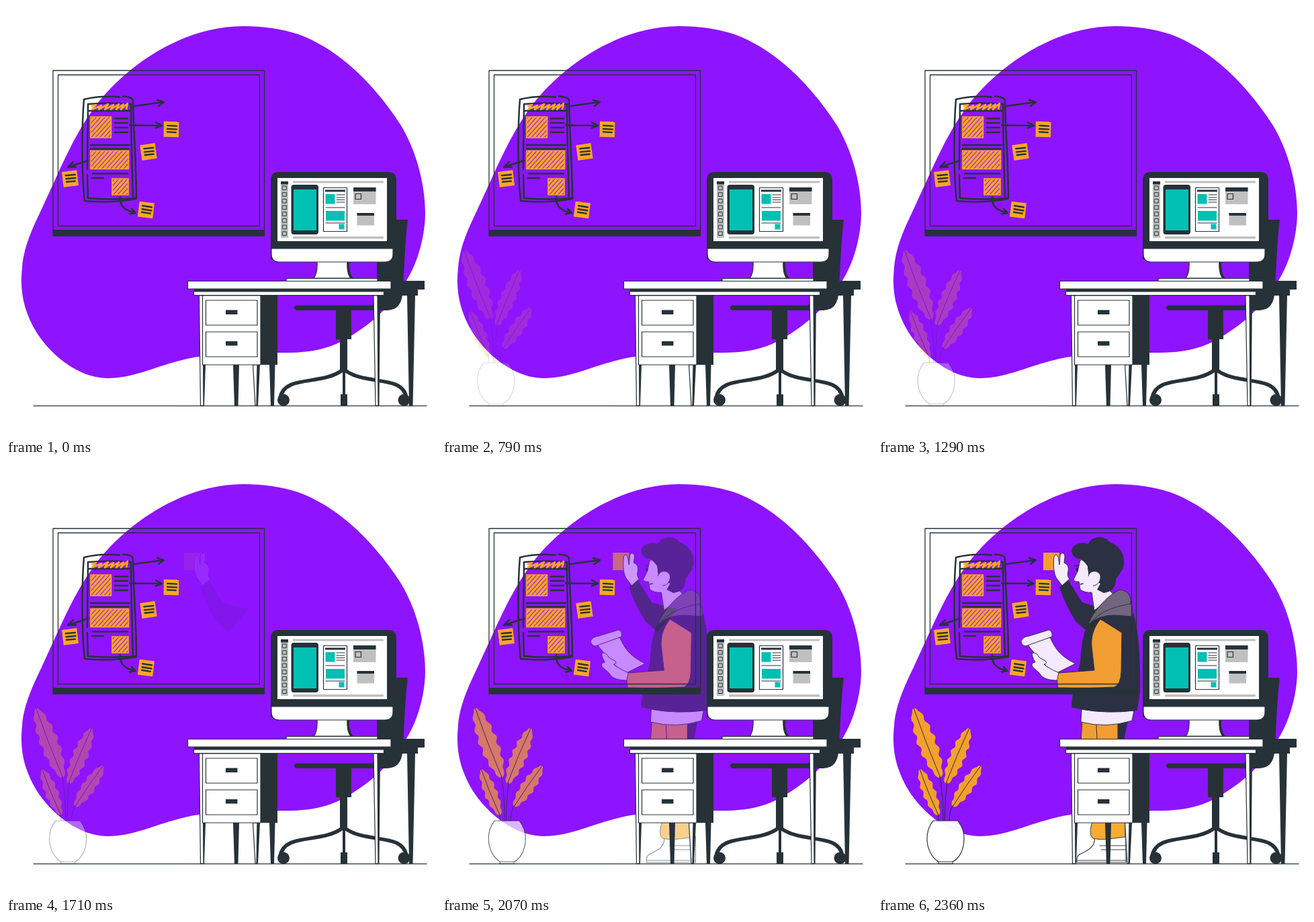
An HTML page for the animation above (2.43 s loop, 640x640 px).

```html
<!DOCTYPE html>
<html lang="en">
<head>
<meta charset="utf-8">
<title>Designer at the board</title>
<style>
  html, body { margin: 0; width: 100%; height: 100%; overflow: hidden; background: #fff; }
  svg { display: block; width: 100%; height: 100%; }
  .line { fill: none; stroke: #263238; stroke-linecap: round; stroke-linejoin: round; }
  .dark { fill: #263238; }
  .white { fill: #fff; stroke: #263238; stroke-width: 1.2; }
  .skin { fill: #fbf7ff; stroke: #263238; stroke-width: 1; stroke-linejoin: round; }
  .orange { fill: #f9a626; }
  .edged { stroke: #263238; stroke-width: 1; }
  .teal { fill: #00bfb3; }
  .grey { fill: #c0c0c0; }
</style>
</head>
<body>
<svg viewBox="0 0 640 640">
  <defs>
    <pattern id="hatch" width="4.8" height="4.8" patternUnits="userSpaceOnUse" patternTransform="rotate(42)">
      <rect width="3.7" height="4.8" class="orange"/>
    </pattern>
  </defs>

  <path fill="#8e14ff" d="M353 30C384 30 410 34 435 42C500 66 552 122 588 178C612 218 624 268 624 310C623 350 610 388 594 412C570 449 545 472 512 492C480 512 450 517 404 516C340 514 300 519 270 525C225 535 190 554 152 554C110 554 68 522 45 485C27 455 20 425 24 390C26 355 45 320 55 298C90 222 105 185 140 140C190 80 270 30 353 30Z"/>

  <g id="arm">
    <path class="orange" d="M246 132H270V158H246Z"/>
    <path class="dark" d="M282 171L270 183C277 205 287 222 294 234Q303 243 313 250L342 216Q322 212 304 206Z"/>
    <path class="skin" d="M274 181L265 169C261 160 261 150 262 138Q265 132 268 138L270 150L271 136C273 130 279 133 278 139L277 147Q285 150 283 160Q281 167 285 171Z"/>
  </g>

  <g id="body">
    <path class="white" d="M322 554C325 570 312 575 300 581Q295 584 296 593H369V554Z"/>
    <path class="line" stroke-width="1" d="M296 590H369M330 568H369M332 574H369"/>
    <path class="orange edged" d="M320 530C314 545 316 555 320 557Q330 560 345 558L368 555V530Z"/>
    <path class="dark" d="M355 386L372 382L366 412H357Z"/>
    <path class="orange edged" d="M304 382H357V412H302Z"/>
    <path class="line" stroke-width="1" d="M325 388L326 410"/>
    <path class="skin" d="M303 365Q340 372 381 367L378 382Q340 394 302 384Z"/>
    <path class="skin" d="M302 142C299 147 299 154 297 160L291 172Q293 176 299 175L301 187Q308 192 318 191L322 218L352 195L335 180L332 162L314 166L312 148Z"/>
    <path class="dark" d="M314 235C303 255 302 280 301 296C296 315 289 335 288 362C320 371 360 370 386 367L390 340C391 300 389 250 380 222L350 210Z"/>
    <path fill="#716b78" class="edged" d="M313 239C320 218 345 193 360 187C372 188 377 197 376 207C380 216 379 225 378 227L352 225Q328 225 313 239Z"/>
    <path class="line" stroke-width="1" d="M318 234C335 217 355 212 376 208"/>
    <path class="dark" d="M313 119C316 108 336 105 345 116C358 121 368 132 366 150C364 160 358 164 354 172C354 184 348 190 336 192L326 187L331 178L320 172L314 166L312 152L303 141C294 142 288 136 288 129C289 120 302 115 313 119Z"/>
    <path class="skin" d="M313 167C315 158 328 157 331 166C332 173 328 181 320 181"/>
    <ellipse class="dark" cx="296.5" cy="157" rx="1.8" ry="3"/>
    <path class="line" stroke-width="1.4" d="M293 152L299 151M301 179L305 178"/>
    <path class="skin" d="M222 268L256 258C262 270 268 285 294 297L264 312C248 300 235 285 222 268Z"/>
    <path class="skin" d="M213 263Q216 257 225 256L254 247Q260 248 259 257L220 271Q213 270 213 263Z"/>
    <path class="skin" d="M230 281Q236 280 240 288L249 293Q253 297 247 298L252 302Q262 308 270 311L268 322C255 322 245 320 240 311L230 302Q227 296 234 295Q228 285 230 281Z"/>
    <path class="orange edged" d="M331 231C320 245 317 258 318 272L322 307L269 311Q265 322 268 333Q320 334 352 332Q361 328 362 310L363 251Z"/>
  </g>

  <!-- whiteboard -->
  <path class="line" stroke-width="1.3" d="M70 96H384.5V342H70ZM77.500 102.500H377.500V327.500H77.500Z"/>
  <path class="dark" d="M70 333H385V342.500H70Z"/>
  <g class="line" stroke-width="2.5">
    <path d="M116 139Q140 133 169 135.500M174 134.500Q187 135 189 140C190 190 194 240 194 287Q155 294 117 290C112 240 113 175 116 139"/>
    <path d="M121 243C121 210 122 175 122 146Q155 143 186 146C186 195 188 240 189 284M121 251L122 286Q160 289 193 286M123 156H185"/>
    <path d="M162 167.500H181M162 174H181M162 181H181M162 188H181M126 207H184M126 212.500H183M129 249.500H181M128 256H145"/>
    <path d="M190 149L235 143M225 140L235 143L227 149M184 177.500L232 178M223 173L232 178L223 181.500M122 230L92 240M100 232L92 240L104 239.500M170 284Q168 303 193 308M187 302L193 308L184 309.500"/>
  </g>
  <g fill="url(#hatch)" stroke="#f9a626" stroke-width="1.6">
    <path d="M126 165H156.500V196H126ZM126 215.500H182.500V242.500H126ZM158 257H182V281H158Z"/>
    <path fill="none" stroke-width="2.6" stroke-linejoin="round" d="M127 149L134 147L128 154L142 148L138 154L152 146L147 154L160 147L156 154L168 146L164 154L175 146L171 154L181 145L179 154"/>
  </g>
  <g id="notes"></g>

  <!-- plant -->
  <g id="plant">
    <g id="leaves"></g>
    <path class="line" stroke-width="1.1" d="M92 465Q97 490 97 533M103 474Q99 505 99.500 533M112 508Q106 515 106 533M89 521L91 533"/>
    <path class="white" d="M82 531H119Q129 545 128 558C128 575 120 588 111 592H90C80 586 73 572 73 558Q73 542 82 531ZM90 592H111V595H90Z"/>
  </g>

  <!-- chair -->
  <path class="dark" d="M570 318H598C594 350 593 385 591 420C590 445 582 453 565 453H432Q425 449 432 445.500H545Q552 440 552 430V375ZM491 452H514V496H508V545H505V578H508V595H498V578H501V545H497V496H491Z"/>
  <path class="line" stroke-width="5.500" d="M502 541C470 566 415 548 408 583M503 541C535 566 590 548 596 583"/>
  <circle class="dark" cx="413" cy="586.500" r="9"/>
  <circle class="dark" cx="592.500" cy="586.500" r="9"/>

  <!-- desk -->
  <path class="dark" d="M573 409H623V422H613V431H563V425H280V421H573ZM379 431H404V534H379ZM292 534H297L295 595H292ZM338 534H347L345.500 595H340ZM373 534H378L375 595H372ZM392 534H400.500L399 595H394ZM553 431H557L555.500 595H552ZM597 431H609L605.500 595H600Z"/>
  <path class="white" d="M270.500 409.500H573V421H270.500ZM279.500 425H562.500V430.500H279.500ZM287.500 431H293L294 595H289.500ZM367.500 534H374L373 595H371ZM547 431H553L554 595H550Z"/>
  <path class="white" d="M292.500 431H379V534H292.500ZM297.500 438H374V475H297.500ZM297.500 485H374V522H297.500Z"/>
  <path class="dark" d="M327 452.500H344.500V459H327ZM327 499H344.500V505.500H327Z"/>

  <!-- monitor -->
  <path class="dark" d="M505 380H511Q510 400 518 406H505Z"/>
  <path class="white" d="M463 380H508Q507 398 513 405H458Q464 398 463 380ZM417 405.500H553V409.500H417Z"/>
  <path class="dark" d="M406 247H569Q581 247 581 259V360Q581 374 570 377H394V259Q394 247 406 247Z"/>
  <path class="white" d="M395 361H576V369Q576 381 564 381H407Q395 381 395 369Z"/>
  <path fill="#fff" d="M404 256H567V350H404Z"/>
  <path class="grey" d="M409 262H420V345H409ZM427 260.500H562V263.500H427ZM427 343H562V346.500H427ZM517 270H550.500V295H517ZM522.500 308H548V326.500H522.500Z"/>
  <path class="dark" d="M409 261H420V265.500H409ZM517 270H550.500V276H517ZM522.500 308H548V312H522.500ZM475 273.500H505V276.500H475Z"/>
  <rect class="dark" x="424.500" y="266" width="40.500" height="74" rx="4"/>
  <path class="line" stroke-width="1.2" d="M472.500 270.500H507.500V335.500H472.500ZM520 279.500H528.500V287.500H520ZM492 281H504M492 285H504M492 288.500H504M492 292H504M476 300H504M476 323H504"/>
  <path class="teal" d="M428 273H462V334H428ZM475.500 280H489.500V294.500H475.500ZM476 305H504V319.500H476ZM495.500 324.500H503.500V332.500H495.500Z"/>
  <g id="tools" class="line"></g>

  <path class="line" stroke-width="1.3" d="M41 595.200H626"/>
</svg>
<script>
const $ = id => document.getElementById(id);

function note([x, y, angle]) {
  return `<g transform="translate(${x} ${y}) rotate(${angle})">
    <path class="orange" d="M-11.2-11.500H11.200V11.500H-11.200Z"/>
    <path class="line" stroke-width="2.400" d="M-6-5.500L8-5M-6-.5L8 0M-6 4L7 4.500"/></g>`;
}

// Wavy-edged leaf from base (bx, by) to tip (tx, ty)
function leaf([bx, by, tx, ty, half, waves]) {
  const dx = tx - bx, dy = ty - by, len = Math.hypot(dx, dy), steps = 60;
  const edge = side => Array.from({ length: steps + 1 }, (_, i) => {
    const u = side > 0 ? i / steps : 1 - i / steps;
    const ripple = 0.86 + 0.14 * Math.sin(u * waves * 2 * Math.PI);
    const w = side * half * Math.sqrt(Math.sin(Math.PI * u) + 1e-6) * ripple;
    return `${(bx + dx * u - dy / len * w).toFixed(1)} ${(by + dy * u + dx / len * w).toFixed(1)}`;
  });
  const points = [...edge(1), ...edge(-1)].join("L");
  return `<path class="orange" d="M${points}Z"/>
    <path class="line" stroke-width="1" d="M${bx} ${by}Q${bx + dx / 2 - 2} ${by + dy / 2} ${tx} ${ty}"/>`;
}

$("notes").innerHTML = [[246, 183.5, 1], [212, 217, -8], [95.5, 257, -7], [208.5, 303.5, 7]].map(note).join("");
$("leaves").innerHTML = [
  [93, 467, 53, 363, 15, 6], [101, 476, 136, 393, 12.5, 6],
  [111, 510, 153, 449, 11, 5], [90, 523, 62, 454, 10.5, 5]
].map(leaf).join("");
$("tools").innerHTML = Array.from({ length: 8 }, (_, i) =>
  `<rect x="411.700" y="${268 + i * 9.7}" width="5.600" height="5.600"/>`).join("");

const LOOP = 2430, REST = 2360, FULL = 2400;
const ramp = (t, from, to) => Math.min(1, Math.max(0, (t - from) / (to - from)));

function place(id, x, opacity) {
  $(id).setAttribute("transform", `translate(${x.toFixed(2)} 0)`);
  $(id).setAttribute("opacity", opacity.toFixed(3));
}

function draw(now) {
  const t = now % LOOP, left = Math.max(0, REST - t);
  place("plant", -0.0129 * left, 0.34 * ramp(t, 0, 1700) + 0.66 * ramp(t, 1700, FULL));
  place("arm", 0.029 * left, ramp(t, 1640, FULL));
  place("body", 0.029 * left, ramp(t, 1710, FULL));
}

const start = performance.now();
function tick() {
  draw(performance.now() - start);
  requestAnimationFrame(tick);
}
tick();
</script>
</body>
</html>
```
